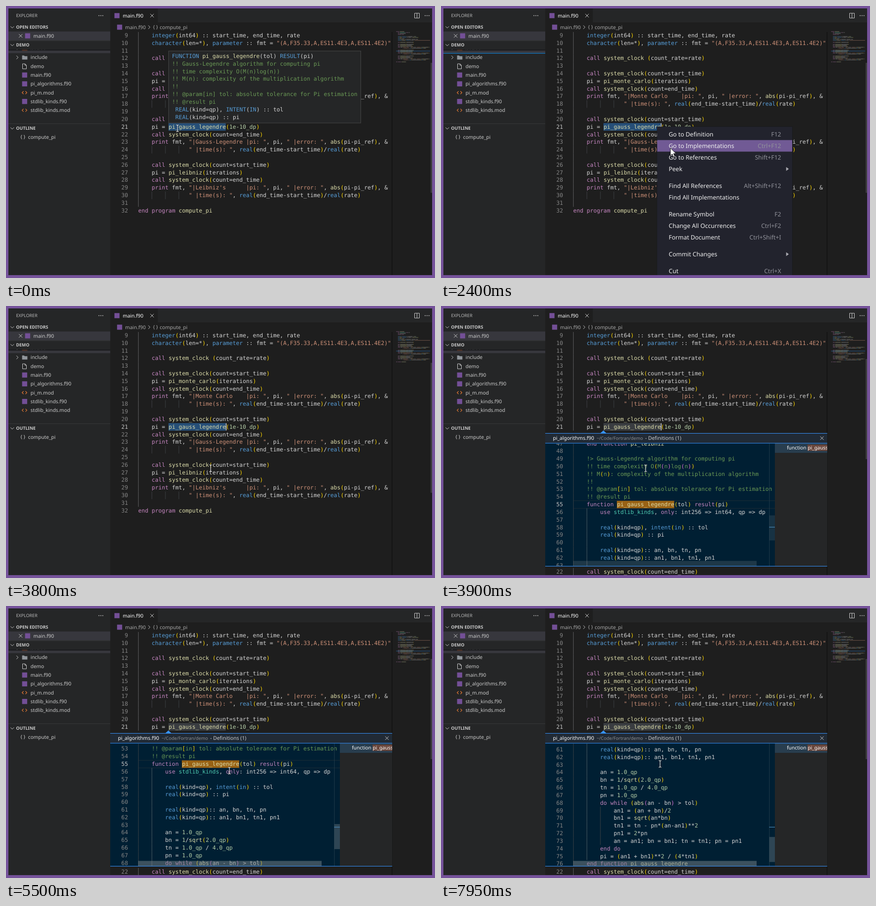
These frames come from a looping animation (893x565 px, 8 s). An HTML page:

```html
<!DOCTYPE html>
<html lang="en">
<head>
<meta charset="utf-8">
<title>Peek definition</title>
<style>
  html, body { margin: 0; width: 100%; height: 100%; overflow: hidden; background: #1e1e1e; }
  svg { display: block; width: 893px; height: 565px; }
  text { white-space: pre; text-rendering: geometricPrecision; font-family: "Noto Sans", sans-serif; }
  .mono { font-family: "DejaVu Sans Mono", monospace; font-size: 11.66px; }
</style>
</head>
<body>
<svg id="stage" viewBox="0 0 893 565" xmlns="http://www.w3.org/2000/svg"></svg>
<script>
const LOOP = 8000, STEP = 50;
const CW = 7.019, LH = 15.82, BASE = 11.62, X0 = 275.2, WHEEL = 41.8;
const FG = '#d4d4d4', KEY = '#c586c0', TYPE = '#569cd6', STR = '#ce9178', NUM = '#b5cea8',
      NOTE = '#6a9955', FN = '#dcdcaa', MOD = '#4ec9b0', UI = '#cccccc', PURPLE = '#734f96',
      BLUE = '#3794ff', PAIRS = ['#ffd700', '#da70d6', '#179fff'];

const words = s => new Set(s.split(' '));
const keywords = words('call print use only function end program do while result implicit none');
const types = words('integer character real parameter intent in FUNCTION RESULT REAL INTENT IN');
const functions = words('pi_gauss_legendre pi_leibniz compute_pi');

const head = `program compute_pi
    use stdlib_kinds, only: dp
    use pi_algorithms
    implicit none

    integer, parameter :: iterations = 10000
    real(dp), parameter :: pi_ref = acos(-1.0_dp)
    real(dp) :: pi`.split('\n');

const report = name => `    print fmt, "|${name.padEnd(15)}|pi: ", pi, " |error: ", abs(pi-pi_ref), &
               " |time(s): ", real(end_time-start_time)/real(rate)`;
const timed = (call, name) => `    call system_clock(count=start_time)
    pi = ${call}
    call system_clock(count=end_time)
${report(name)}
`;
const main = `    integer(int64) :: start_time, end_time, rate
    character(len=*), parameter :: fmt = "(A,F35.33,A,ES11.4E3,A,ES11.4E2)"

    call system_clock (count_rate=rate)

${timed('pi_monte_carlo(iterations)', 'Monte Carlo')}
${timed('pi_gauss_legendre(1e-10_dp)', 'Gauss-Legendre')}
${timed('pi_leibniz(iterations)', "Leibniz's")}
end program compute_pi`.split('\n');

const peeked = `    end function pi_leibniz

    !> Gauss-Legendre algorithm for computing pi
    !! time complexity O(M(n)log(n))
    !! M(n): complexity of the multiplication algorithm
    !!
    !! @param[in] tol: absolute tolerance for Pi estimation
    !! @result pi
    function pi_gauss_legendre(tol) result(pi)
        use stdlib_kinds, only: int256 => int64, qp => dp

        real(kind=qp), intent(in) :: tol
        real(kind=qp) :: pi

        real(kind=qp):: an, bn, tn, pn
        real(kind=qp):: an1, bn1, tn1, pn1

        an = 1.0_qp
        bn = 1/sqrt(2.0_qp)
        tn = 1.0_qp / 4.0_qp
        pn = 1.0_qp
        do while (abs(an - bn) > tol)
            an1 = (an + bn)/2
            bn1 = sqrt(an*bn)
            tn1 = tn - pn*(an-an1)**2
            pn1 = 2*pn
            an = an1; bn = bn1; tn = tn1; pn = pn1
        end do
        pi = (an1 + bn1)**2 / (4*tn1)
    end function pi_gauss_legendre`.split('\n');

const hover = `FUNCTION pi_gauss_legendre(tol) RESULT(pi)
!! Gauss-Legendre algorithm for computing pi
!! time complexity O(M(n)log(n))
!! M(n): complexity of the multiplication algorithm
!!
!! @param[in] tol: absolute tolerance for Pi estimation
!! @result pi
 REAL(kind=qp), INTENT(IN) :: tol
 REAL(kind=qp) :: pi`.split('\n');

// --- drawing helpers ---
const esc = s => s.replace(/&/g, '&amp;').replace(/</g, '&lt;').replace(/>/g, '&gt;');
const rect = (x, y, w, h, fill, more = '') =>
  `<rect x="${x}" y="${y}" width="${w}" height="${h}" fill="${fill}" ${more}/>`;
const stroke = (d, color = UI, width = 1, more = '') =>
  `<path d="${d}" fill="none" stroke="${color}" stroke-width="${width}" ${more}/>`;
const label = (x, mid, s, size = 10.4, fill = UI, more = '') =>
  `<text x="${x}" y="${mid + size * .355}" font-size="${size}" fill="${fill}" ${more}>${esc(s)}</text>`;
const group = (id, body, more = '') => `<g id="${id}" ${more}>${body}</g>`;
const cross = (x, y, r = 3.6) => stroke(`M${x - r} ${y - r}l${2 * r} ${2 * r}m0 ${-2 * r}l${-2 * r} ${2 * r}`);
const down = (x, y) => stroke(`M${x - 3.5} ${y - 1.7}l3.5 3.5 3.5-3.5`);
const right = (x, y) => stroke(`M${x - 1.8} ${y - 3.6}l3.6 3.6-3.6 3.6`);
const dots = (x, y) => [-4, 0, 4].map(d => `<circle cx="${x + d}" cy="${y}" r=".9" fill="${UI}"/>`).join('');
const badge = (x, y) => rect(x - 5.3, y - 5.3, 10.6, 10.6, PURPLE);

function tokens(src, plain) {
  const rx = /(!.*)|("[^"]*")|(\d+(?:\.\d+)?(?:e-?\d+)?(?:_\w+)?)|([A-Za-z_]\w*)(?=(\s*\()?)|([()[\]])|[^\w"!()[\]]+/g;
  const out = [];
  let depth = 0;
  const pair = c => PAIRS[('(['.includes(c) ? depth++ : --depth) % 3];
  for (const [all, note, str, num, id, called, br] of src.matchAll(rx)) {
    if (note && !plain) {
      for (const s of note.match(/[()[\]]|[^()[\]]+/g)) out.push([/^[()[\]]/.test(s) ? pair(s) : NOTE, s]);
      continue;
    }
    const color = note ? NOTE : str ? STR : num ? NUM
      : br ? (plain ? FG : pair(br))
      : !id ? FG
      : keywords.has(id) ? KEY : types.has(id) ? TYPE : id === 'stdlib_kinds' ? MOD
      : called || functions.has(id) ? FN : FG;
    out.push([color, all]);
  }
  return out;
}
const indent = s => s.length - s.trimStart().length;
const codeLine = (src, x, y, plain) => `<text class="mono" xml:space="preserve" x="${x + indent(src) * CW}" y="${y}">` +
  tokens(src.trimStart(), plain).map(([c, s]) => `<tspan fill="${c}">${esc(s)}</tspan>`).join('') + '</text>';

// Rows of code with numbers and indent guides; the first row starts at y = 0.
function rows(list, first, current, strongCol, strong) {
  return list.map((src, i) => {
    const y = i * LH, n = first + i, next = list.slice(i + 1).find(s => s);
    const cols = src ? indent(src) : indent(next || '') || 4;
    let out = '';
    for (let c = 0; c < cols; c += 4)
      out += rect((X0 + c * CW).toFixed(1), y, .9, LH, c === strongCol ? strong : '#404448');
    out += `<text class="mono" x="254" y="${y + BASE}" text-anchor="end" fill="${n === current ? '#c6c6c6' : '#858585'}">${n}</text>`;
    return out + (src ? codeLine(src, X0, y + BASE) : '');
  }).join('');
}

// --- sidebar ---
function sidebar() {
  const header = (y, s) => down(13, y) + label(21, y, s, 9.15, UI, 'font-weight="700"');
  const row = i => 106.8 + i * 18.3;
  const folder = (y, c) => `<path d="M33.5 ${y - 4}h4l1.5 1.5h5.5v7h-11z" fill="${c}"/>`;
  const angle = y => stroke(`M36.5 ${y - 3}l-3 3 3 3m4-6l3 3-3 3`, '#e37933', 1.2);
  const files = ['demo', 'main.f90', 'pi_algorithms.f90', 'pi_m.mod', 'stdlib_kinds.f90', 'stdlib_kinds.mod'];
  let out = rect(5, 5, 212, 554, '#252627') + label(21, 20, 'EXPLORER', 9.2, '#bbbbbb') + dots(197.5, 20)
    + header(44, 'OPEN EDITORS') + rect(5, 53, 212, 18.5, '#37373d') + cross(30.5, 62) + badge(45, 62) + label(57, 62, 'main.f90')
    + group('top', rect(5, 90, 212, 8, '#37373d') + stroke('M20 88l3 3 3-3') + folder(88.5, '#c9663d') + label(51, 88.5, 'assets'),
        'clip-path="url(#treeClip)"')
    + rect(5, 90.3, 212, 2.2, '#18191a')
    + group('focus', rect(5, 97.7, 212, 1.1, '#0a84dd'))
    + stroke('M5 72h212M5 244.5h212', '#3a3b3d', .9) + header(81, 'DEMO')
    + right(23.5, row(0)) + folder(row(0), '#90959a') + label(51, row(0), 'include');
  files.forEach((name, i) => {
    const y = row(i + 1);
    out += label(51, y, name) + (i === 0
      ? stroke(`M34.5 ${y - 5}h5l3 3v7.5h-8zM39.5 ${y - 5}v3h3`)
      : name.endsWith('f90') ? badge(38.8, y) : angle(y));
  });
  return out + header(254, 'OUTLINE') + label(30, 271.5, '{ }', 10) + label(46, 272, 'compute_pi');
}

// --- editor chrome ---
function chrome() {
  return rect(316, 5, 571, 29, '#252627') + badge(231, 20) + label(243, 20, 'main.f90', 10.4, '#ffffff') + cross(304, 20)
    + stroke('M850.5 15h10v10h-10zM855.5 15v10') + dots(876.5, 20)
    + badge(236.5, 44) + label(248, 44, 'main.f90', 10.4, '#a9a9a9') + right(298, 44)
    + label(306, 43.5, '{ }', 10, '#a9a9a9') + label(320, 44, 'compute_pi', 10.5, '#a9a9a9');
}
function minimap() {
  const cw = .945;
  let out = rect(803, 54, 84, 505, '#1e1e1e') + rect(802.5, 54, 2.2, 505, '#151515')
    + rect(812, 92.8, 71, 1.5, '#264f78', 'opacity=".8"');
  [...head, ...main].forEach((src, i) => {
    let col = indent(src);
    for (const [color, s] of tokens(src.trimStart())) {
      for (const m of s.matchAll(/\S+/g))
        out += rect((812 + (col + m.index) * cw).toFixed(1), (52.6 + i * 2.03).toFixed(1), (m[0].length * cw).toFixed(1), 1.1, color, 'opacity=".4"');
      col += s.length;
    }
  });
  return out + rect(883.8, 118, 3.2, 270, '#3c3c3d', 'id="bar"');
}

// --- popups ---
const hoverBox = () => rect(338.5, 93.5, 400, 149.5, '#252627', 'stroke="#454545"')
  + hover.map((s, i) => codeLine(s, 345.6, 107.95 + i * LH, true)).join('');

const items = [[266.5, 'Go to Definition', 'F12'], [290.5, 'Go to Implementations', 'Ctrl+F12'],
  [314.5, 'Go to References', 'Shift+F12'], [338.5, 'Peek', ''], [373.5, 'Find All References', 'Alt+Shift+F12'],
  [397.5, 'Find All Implementations'], [432.5, 'Rename Symbol', 'F2'], [456.5, 'Change All Occurrences', 'Ctrl+F2'],
  [480.5, 'Format Document', 'Ctrl+Shift+I'], [515.5, 'Commit Changes', ''], [550.5, 'Cut', 'Ctrl+X']];
const subItems = [[343, 'Peek Definition', 'Ctrl+Shift+F10'], [367, 'Peek Implementations', 'Ctrl+Shift+F12'], [391, 'Peek References']];
const entries = (list, x, end) => list.map(([y, name, key]) => label(x, y, name, 12.5, '#f0f0f0')
  + (key ? label(end, y, key, 12.5, '#92939b', 'text-anchor="end"') : '')
  + (key === '' ? `<path d="M718.5 ${y - 4}l5.5 4-5.5 4z" fill="#a9a9b0"/>` : '')).join('');
const menuBox = () => rect(449, 250, 283, 312, '#15161c', 'opacity=".5"') + rect(450, 251, 281, 310, '#22232d')
  + rect(450, 326.5, 281, 24, '#715a95', 'id="pick"') + entries(items, 474, 708);
const subBox = () => rect(146, 327, 304, 80, '#22232d') + rect(146, 331, 304, 24, '#715a95', 'id="subPick"')
  + entries(subItems, 170, 427);

function peekBox() {
  const word = rect(366, 126.8, 119.5, 15.4, '#996214');
  const rules = stroke(`M275 ${8 * LH}h420M275 ${9 * LH}h420`, '#1c2c36');
  return rect(217, 264, 587, 277, '#001f33') + rect(217, 265, 587, 20, '#212a35')
    + label(233, 274.5, 'pi_algorithms.f90', 10.5, '#ffffff') + label(324, 274.8, '~/Code/Fortran/demo', 9.4, '#8d8f91')
    + label(425, 274.5, '- Definitions (1)', 10.6, '#d0d0d0') + cross(793, 274.5)
    + group('peekClip', group('peekCode', rules + word + rows(peeked, 47, 55, 4, '#566268')), 'clip-path="url(#peekArea)"')
    + rect(683, 285, .8, 255, '#26404f')
    + group('bars', rect(275, 529.5, 382, 11, '#798489', 'opacity=".5"')
      + rect(683.5, 435, 11.5, 52, '#798489', 'opacity=".38" id="vbar"'))
    + rect(683, 458.8, 12, 1.2, '#4b88b5')
    + rect(695, 285, 109, 255, '#252627') + rect(695, 285, 109, 20, '#283d4e') + rect(763, 288, 41, 13, '#69463c')
    + group('ref', label(720, 294.5, 'function pi_gauss_legendre(tol)', 10.4, '#ffffff'), 'clip-path="url(#code)"')
    + stroke('M217 264.5h587M217 285h587M217 540.5h587', BLUE, 1.1)
    + `<path d="M331.5 264.5l6.5-6 6.5 6z" fill="${BLUE}"/>`;
}

const clip = (id, x, y, w, h) => `<clipPath id="${id}">${rect(x, y, w, h, '#000')}</clipPath>`;
const beam = 'M-2.8 -7q2.8 0 2.8 1.4q0-1.4 2.8-1.4M0-6v12M-2.8 7q2.8 0 2.8-1.4q0 1.4 2.8 1.4';
document.getElementById('stage').innerHTML =
  '<defs>' + clip('code', 217, 54, 587, 505) + clip('peekArea', 217, 286, 478, 254) + clip('treeClip', 5, 90, 212, 8) + '</defs>'
  + rect(0, 0, 893, 565, '#1e1e1e') + sidebar() + chrome()
  + group('editor', rect(338.2, 243.2, 119.3, 15.7, '#264f78', 'id="sel"')
      + group('upper', rows(main.slice(0, 13), 9, 21, 0, '#66686a'), `transform="translate(0 ${243.1 - 12 * LH})"`)
      + group('lower', rows(main.slice(13), 22, 0, 0, '#66686a'))
      + rect(457.6, 243.5, 1.5, 15, '#dcdcdc', 'id="caret"'), 'clip-path="url(#code)"')
  + minimap() + group('hover', hoverBox()) + group('peek', peekBox()) + group('menu', menuBox()) + group('sub', subBox())
  + group('beam', stroke(beam, '#111', 2.4, 'opacity=".5"') + stroke(beam, '#fff', 1.1))
  + group('arrow', '<path d="M0 0v16l3.8-3.4 2.5 5.9 2.7-1.2-2.5-5.7h5z" fill="#fff" stroke="#222" stroke-width="1"/>')
  + `<path d="M0 0h893v565H0zM5 5v554h882V5z" fill="#75529a" fill-rule="evenodd"/>`;

// --- timeline ---
const pointer = [[300, 357, 254], [1100, 444, 250], [1350, 444, 250], [1500, 452, 252], [1950, 452, 252],
  [2800, 499, 331], [2850, 498, 332.5], [2950, 498, 332.5], [3500, 426, 337], [4450, 426, 337], [4750, 465, 342],
  [7450, 465, 342], [7500, 465, 341], [7750, 465, 341], [7950, 456, 328]];
const wheel = [5250, 5300, 5450, 5500, 6150, 6200, 6300, 6350, 6750, 6800];

function pointerAt(t) {
  const i = pointer.findIndex(p => p[0] > t);
  if (i === 0) return pointer[0].slice(1);
  if (i < 0) return pointer[pointer.length - 1].slice(1);
  const [a, b] = [pointer[i - 1], pointer[i]];
  const u = (t - a[0]) / (b[0] - a[0]), e = u * u * (3 - 2 * u);
  return [a[1] + (b[1] - a[1]) * e, a[2] + (b[2] - a[2]) * e];
}
const el = {};
document.querySelectorAll('[id]').forEach(n => el[n.id] = n);
const show = (id, on) => el[id].setAttribute('visibility', on ? 'visible' : 'hidden');
const move = (id, x, y) => el[id].setAttribute('transform', `translate(${x.toFixed(2)} ${y.toFixed(2)})`);
const set = (id, name, value) => el[id].setAttribute(name, value);

function render(t) {
  const [x, y] = pointerAt(t);
  const menu = t >= 2000 && t < 3800, peek = t >= 3850, sub = menu && t >= 3000;
  show('hover', t < 2000);
  show('menu', menu);
  show('sub', sub);
  show('focus', menu);
  show('peek', peek);
  show('caret', (t >= 650 && t < 1250) || (t >= 1850 && t < 3950));
  set('sel', 'fill', peek ? '#3a3d41' : '#264f78');

  const hit = sub ? items[3] : items.find(([iy]) => Math.abs(iy - y) <= 12);
  show('pick', menu && hit);
  if (hit) set('pick', 'y', hit[0] - 12);
  show('subPick', sub && x < 450 && y >= 331);

  move('lower', 0, 258.92 + (peek ? 285.2 : 0));
  set('bar', 'y', peek ? 110 : 118);
  set('bar', 'height', peek ? 208 : 270);

  const scroll = Math.round(wheel.filter(w => w <= t).length / 2 * WHEEL);
  move('peekCode', 0, 404.5 - 8 * LH - scroll);
  set('vbar', 'y', 435 + scroll * .214);
  set('bars', 'opacity', Math.min(1, Math.max(.5, (t - 3750) / 300)));

  show('beam', !menu);
  show('arrow', menu);
  move(menu ? 'arrow' : 'beam', x, y);
}

const start = performance.now();
function tick() {
  const t = (performance.now() - start) % LOOP;
  render(Math.floor(t / STEP) * STEP);
  requestAnimationFrame(tick);
}
tick();
</script>
</body>
</html>
```
